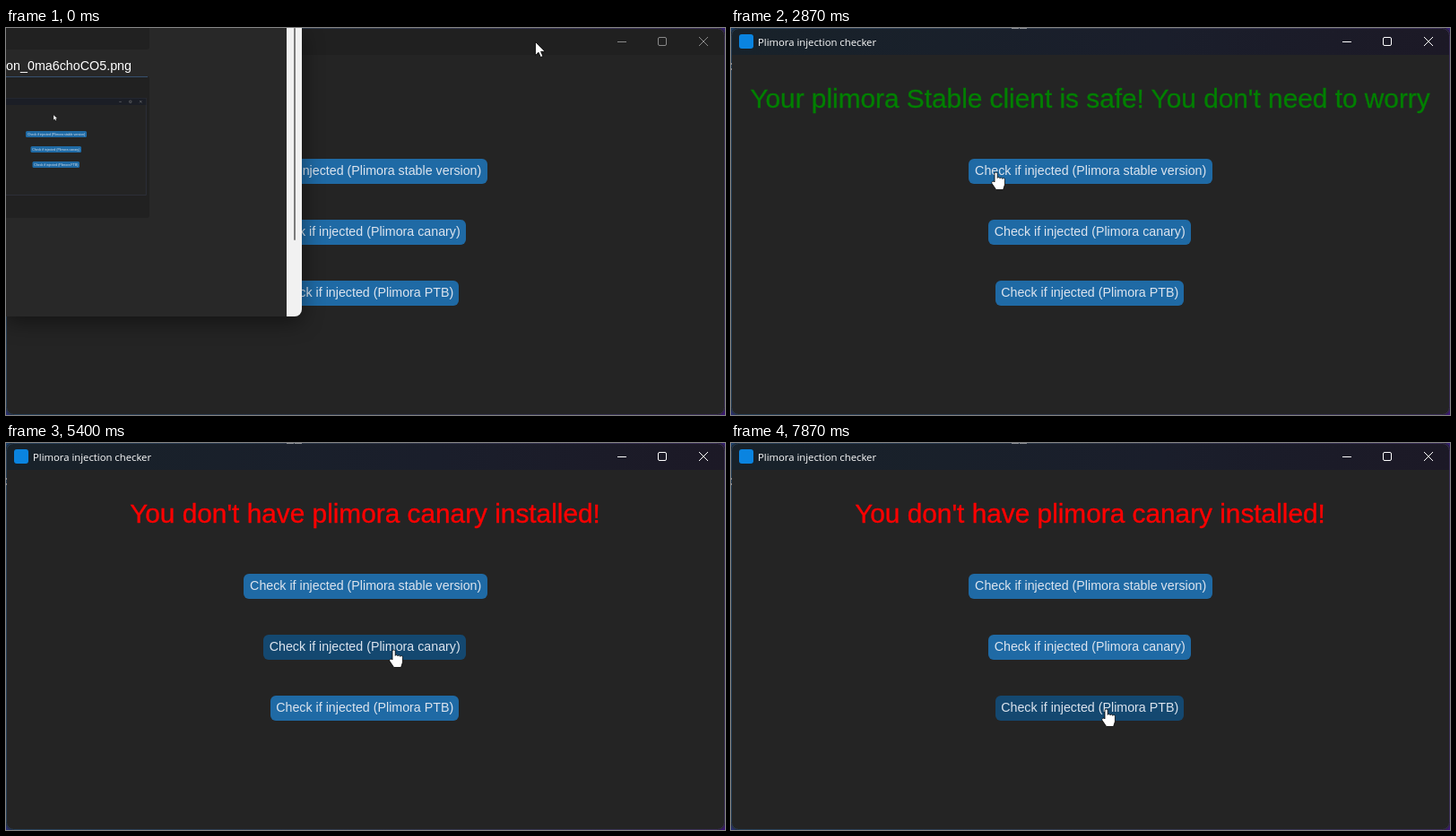
An HTML page for the animation above (8000 ms loop, 802 by 432 pixels).

```html
<!DOCTYPE html>
<html lang="en">
<head>
<meta charset="utf-8">
<title>Injection checker</title>
<style>
  html, body { margin: 0; width: 100%; height: 100%; overflow: hidden; background: #242424; }
  svg { display: block; width: 100%; height: 100%; }
  text { font-family: "Liberation Sans", Arial, sans-serif; }
  .btn rect { fill: #1f6aa5; }
  .btn.hover rect { fill: #144870; }
  .btn text { font-size: 14.25px; fill: #dce4ee; text-anchor: middle; }
  .head { font-size: 29.8px; text-anchor: middle; stroke-width: .35; }
  .safe { fill: #008000; stroke: #008000; }
  .missing { fill: #f00; stroke: #f00; }
  .title { font: 11.3px "Open Sans", "Noto Sans", sans-serif; fill: #fff; }
  .panel { filter: drop-shadow(0 6px 12px rgba(0, 0, 0, .45)); }
  .pointer { fill: #fff; stroke: #000; stroke-width: .8; }
</style>
</head>
<body>
<svg viewBox="0 0 802 432" xmlns="http://www.w3.org/2000/svg">
  <defs>
    <linearGradient id="desk" x2="1" y2=".5">
      <stop stop-color="#1c3f68"/><stop offset="1" stop-color="#3a1772"/>
    </linearGradient>
    <linearGradient id="edge">
      <stop stop-color="#263f58"/><stop offset=".5" stop-color="#303848"/><stop offset="1" stop-color="#3a2e54"/>
    </linearGradient>
    <linearGradient id="bar">
      <stop stop-color="#18222a"/><stop offset=".6" stop-color="#1a1e2b"/><stop offset="1" stop-color="#1c1926"/>
    </linearGradient>
    <clipPath id="frame"><rect width="802" height="432" rx="8"/></clipPath>
    <path id="arrowShape" d="M.5 .5V15.5L4 12.2L6.4 17.6L8.9 16.5L6.6 11.3H11.2Z"/>
    <path id="handShape" d="M-2 11V1.6a1.6 1.6 0 0 1 3.2 0V6.4a1.5 1.5 0 0 1 2.8 .4a1.5 1.5 0 0 1 2.8 .6a1.4 1.4 0 0 1 2.6 1V14L7.6 19.5H-.3L-5 12.6a1.6 1.6 0 0 1 3 -1.6Z"/>
  </defs>

  <rect width="802" height="432" fill="url(#desk)"/>
  <g clip-path="url(#frame)">
    <rect width="802" height="432" fill="#242424"/>
    <rect width="802" height="30" fill="#202020"/>
    <rect id="activeBar" width="802" height="30" fill="url(#bar)"/>
  </g>
  <rect x=".5" y=".5" width="801" height="431" rx="8" fill="none" stroke="url(#edge)"/>
  <path id="peek" fill="#8b8f96" d="M313 0h8v1h-8zM322 0h8v1h-8zM0 39h1v2h-1zM0 45h1v2h-1z"/>

  <rect x="9" y="7" width="16" height="16" rx="3" fill="#0a84e0"/>
  <text class="title" x="30" y="20">Plimora injection checker</text>
  <g id="controls" fill="none" stroke="currentColor">
    <path d="M682 15.5h10M773 10l10 10M783 10l-10 10"/>
    <rect x="727.5" y="10.5" width="9" height="9" rx="1.5"/>
  </g>

  <text id="safe" class="head safe" x="400.5" y="89">Your plimora Stable client is safe! You don't need to worry</text>
  <text id="missing" class="head missing" x="400.5" y="89">You don't have plimora canary installed!</text>
  <g id="buttons"></g>

  <g id="panel" class="panel">
    <path d="M0 0H330V314a8 8 0 0 1 -8 8H0Z" fill="#282828"/>
    <path d="M313 0H330V314a8 8 0 0 1 -8 8H313Z" fill="#f1f1f1"/>
    <rect x="321" width="2" height="237" rx="1" fill="#7c7c7c"/>
    <path d="M0 0H160V21a3 3 0 0 1 -3 3H0Z" fill="#212121"/>
    <text x="140" y="47" font-size="14.3" fill="#fff" text-anchor="end">on_0ma6choCO5.png</text>
    <path d="M0 54H157a3 3 0 0 1 3 3V209a3 3 0 0 1 -3 3H0Z" fill="#212121"/>
    <path d="M0 54.5H158" stroke="#36506f"/>
    <g transform="translate(-44.25 78.5) scale(.25)">
      <rect width="802" height="432" fill="#242424" stroke="#303440" stroke-width="3"/>
      <rect width="802" height="30" fill="#1b1e26"/>
      <use href="#controls" color="#fff" stroke-width="2"/>
      <use href="#safe"/>
      <use href="#buttons"/>
      <use href="#arrowShape" transform="translate(389 74) scale(1.4)" fill="#fff"/>
    </g>
  </g>

  <g id="pointer" class="pointer">
    <use id="arrow" href="#arrowShape"/>
    <use id="hand" href="#handShape"/>
  </g>
</svg>
<script>
const LOOP = 8000, TICK = 200 / 3;
const $ = id => document.getElementById(id);

// Eased moves between rests, in ticks: each bends toward a control point
const home = [590, 15];
const moves = [
  { from: 0, to: 5, bend: [596, 10], end: [601, 19] },
  { from: 15, to: 17, bend: [579, 19], end: [557, 19] },
  { from: 19, to: 35, bend: [109, 71], end: [296, 161] },
  { from: 47, to: 56, bend: [235, 130], end: [173, 81] },
  { from: 58, to: 73, bend: [249, 279], end: [433, 231] },
  { from: 83, to: 97, bend: [300, -49], end: [276, 84] },
  { from: 98, to: 110, bend: [291, 198], end: [377, 236] },
  { from: 111, to: 118, bend: [398, 266], end: [419, 297] }
];
// Clicks replace the heading and lift the hover shade for two ticks
const clicks = [43, 79];

function pointerAt(k) {
  let p = home;
  for (const { from, to, bend, end } of moves) {
    if (k <= from) break;
    const u = Math.min(1, (k - from) / (to - from));
    const s = (1 - Math.cos(Math.PI * u)) / 2, r = 1 - s;
    p = p.map((v, i) => r * r * v + 2 * r * s * bend[i] + s * s * end[i]);
  }
  return p.map(Math.round);
}

function add(parent, tag, attrs) {
  const el = document.createElementNS('http://www.w3.org/2000/svg', tag);
  for (const key in attrs) el.setAttribute(key, attrs[key]);
  return parent.appendChild(el);
}

const labels = [['stable version', 265, 272], ['canary', 287, 226], ['PTB', 295, 210]];
const buttons = labels.map(([name, x, w], i) => {
  const y = 146 + 68 * i, h = 28;
  const el = add($('buttons'), 'g', { class: 'btn' });
  add(el, 'rect', { x, y, width: w, height: h, rx: 6 });
  add(el, 'text', { x: x + w / 2 + .2, y: y + 18 }).textContent = `Check if injected (Plimora ${name})`;
  return { el, hit: (px, py) => px > x && px < x + w && py > y && py < y + h };
});

const show = (id, on) => $(id).setAttribute('visibility', on ? 'visible' : 'hidden');

// Ticks begin on whole hundredths of a second
function tickAt(t) {
  const k = Math.ceil(t / TICK);
  return Math.round(k * TICK / 10) * 10 <= t ? k : k - 1;
}

function draw(t) {
  const k = tickAt(t + 5) > tickAt(t) && Math.round(tickAt(t + 5) * TICK / 10) * 10 <= t ? tickAt(t + 5) : tickAt(t);
  const [x, y] = pointerAt(k);
  const pressed = clicks.some(c => k >= c && k < c + 2);
  const over = buttons.find(b => b.hit(x, y));
  for (const b of buttons) b.el.classList.toggle('hover', b === over && !pressed);

  $('pointer').setAttribute('transform', `translate(${x} ${y})`);
  show('arrow', !over);
  show('hand', over);

  const active = Math.min(1, Math.max(0, (k - 9) / 4)), raised = k >= 10;
  const grey = 138 + 117 * active;
  $('activeBar').style.opacity = active;
  $('controls').style.color = `rgb(${grey}, ${grey}, ${grey})`;
  $('panel').style.display = raised ? 'none' : '';
  show('peek', raised);
  // Stays painted under the panel, whose thumbnail reuses it
  $('safe').style.opacity = 1;
  show('safe', k >= clicks[0] && k < clicks[1]);
  show('missing', k >= clicks[1]);
}

const origin = performance.now();
function loop() {
  draw((performance.now() - origin) % LOOP);
  requestAnimationFrame(loop);
}
loop();
</script>
</body>
</html>
```
